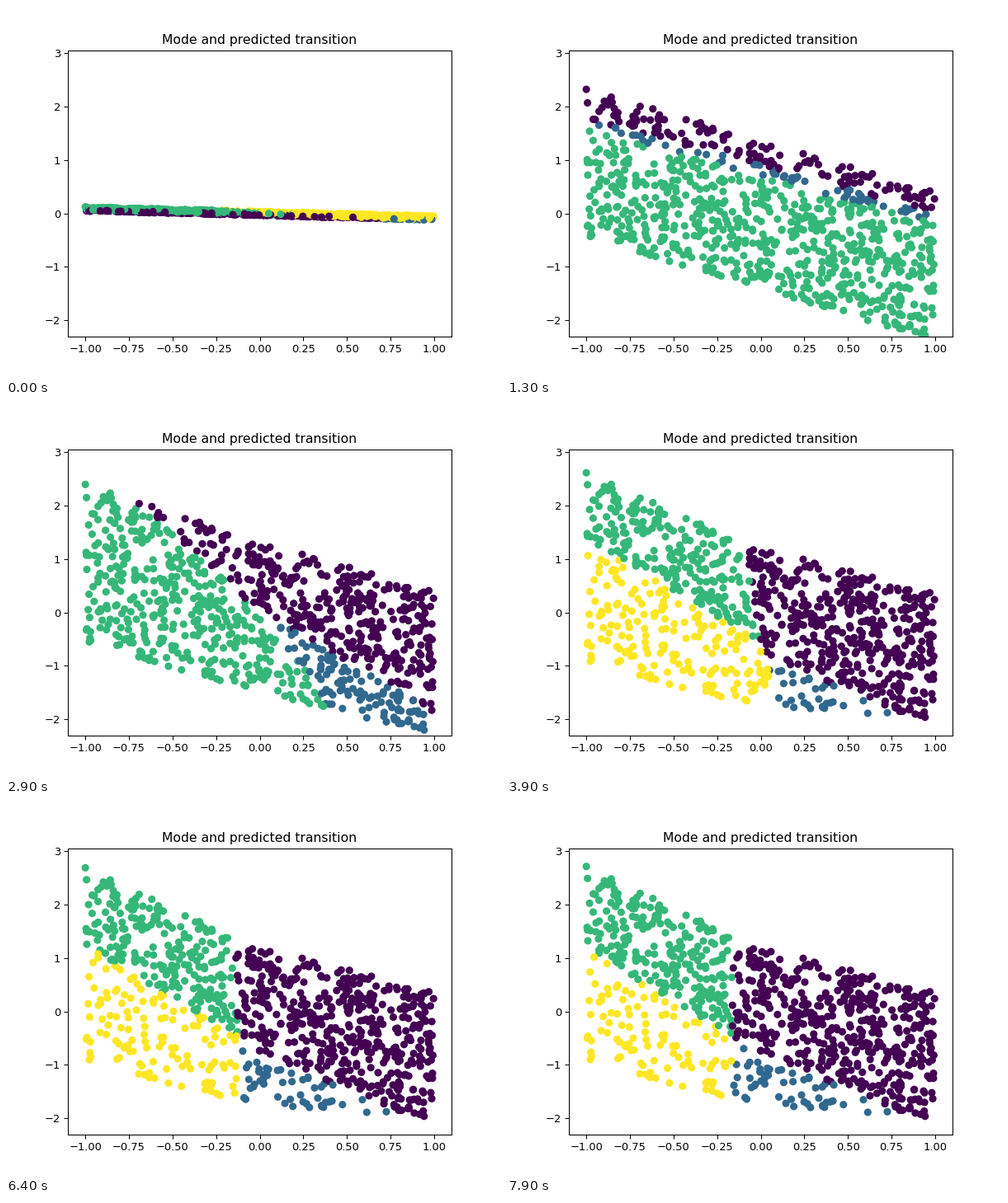
These frames come from a looping animation (600 px wide and 450 px high, 8000 ms). A matplotlib script:

```python
import numpy as np
import matplotlib.pyplot as plt
from matplotlib.animation import FuncAnimation

FRAMES, INTERVAL = 80, 100
POINTS = 900

rng = np.random.default_rng(4)
x, u = rng.uniform(-1, 1, (2, POINTS))
x[0], u[0] = -1, 0.99  # the band's upper left corner

# Each state gives the predicted y and one score per mode; the best score wins.


def flat():
    """A nearly flat band before training."""
    y = 0.04 * u - 0.085 * x
    lower_right = 3 * (x - 0.6) - 2 * (u + 1)
    upper_left = u + 0.4
    upper_right = upper_left + x + 0.385 * u - 0.13
    return y, np.array([0 * x, lower_right, upper_left, upper_right])


def layered(level, slope, thickness):
    """A sheared band cut into three layers."""
    y = 1.39 * u - 0.97 * x - 0.02
    middle = level + slope * x - y
    low = 2 * middle - thickness
    return y, np.array([0 * x, middle, low, low - 2])


def split(s):
    """Four modes that settle as s goes from 0 to 1; lower ones are stretched."""
    top = np.maximum(1.15 - (1.48 + 0.1 * s) * x, 1.22 - 0.87 * x)
    bottom = np.maximum(-1.8 - 0.85 * x, -1.76 - 0.22 * x)
    border = -0.03 - 0.135 * s
    left_cut = -0.55 - 0.23 * s - 1.95 * x
    right_cut = -0.74 - 1.45 * x
    cut = np.where(x < border, left_cut, right_cut)

    gain = 1.2
    knee = np.maximum(1 - (top - cut) / gain, -1)
    stretch = (u + 1) / np.maximum(knee + 1, 1e-6)
    y = np.where(u > knee, top - gain * (1 - u), bottom + (cut - bottom) * stretch)

    upper_left = 5 * (border - 0.04 * (1 - s) * y - x)
    return y, np.array([0 * x, right_cut - y, upper_left, upper_left + left_cut - y])


def ease_out(s):
    return 1 - (1 - s) ** 3


def linear(s):
    return s


states = [flat(), layered(0.9, -0.88, 0.2), layered(0.33, -2.1, 0.55),
          split(0), split(1)]
eases = [ease_out, linear, np.square, np.sqrt]

# Training rests during these frames and advances one step in all others.
resting = np.r_[0:4, 10, 16, 22:24, 35:39, 40, 50:53, 55:57]
progress = np.cumsum(~np.isin(np.arange(FRAMES), resting))
milestones = progress[[0, 13, 21, 39, FRAMES - 1]]


def evaluate(frame):
    step = progress[frame]
    i = min(np.searchsorted(milestones, step, side="right") - 1, len(eases) - 1)
    start, end = milestones[i:i + 2]
    s = eases[i]((step - start) / (end - start))
    y, scores = [a + (b - a) * s for a, b in zip(states[i], states[i + 1])]
    return y, scores.argmax(axis=0)


fig, ax = plt.subplots(figsize=(6.4, 4.8), dpi=93.75)
y, mode = evaluate(0)
dots = ax.scatter(x, y, c=mode, cmap="viridis", vmin=0, vmax=3)
ax.set_title("Mode and predicted transition")
ax.set_xlim(-1.1, 1.1)
ax.set_ylim(-2.301, 3.054)


def update(frame):
    y, mode = evaluate(frame)
    dots.set_offsets(np.column_stack([x, y]))
    dots.set_array(mode)
    return dots,


anim = FuncAnimation(fig, update, frames=FRAMES, interval=INTERVAL,
                     repeat=True, repeat_delay=0)
plt.show()
```
